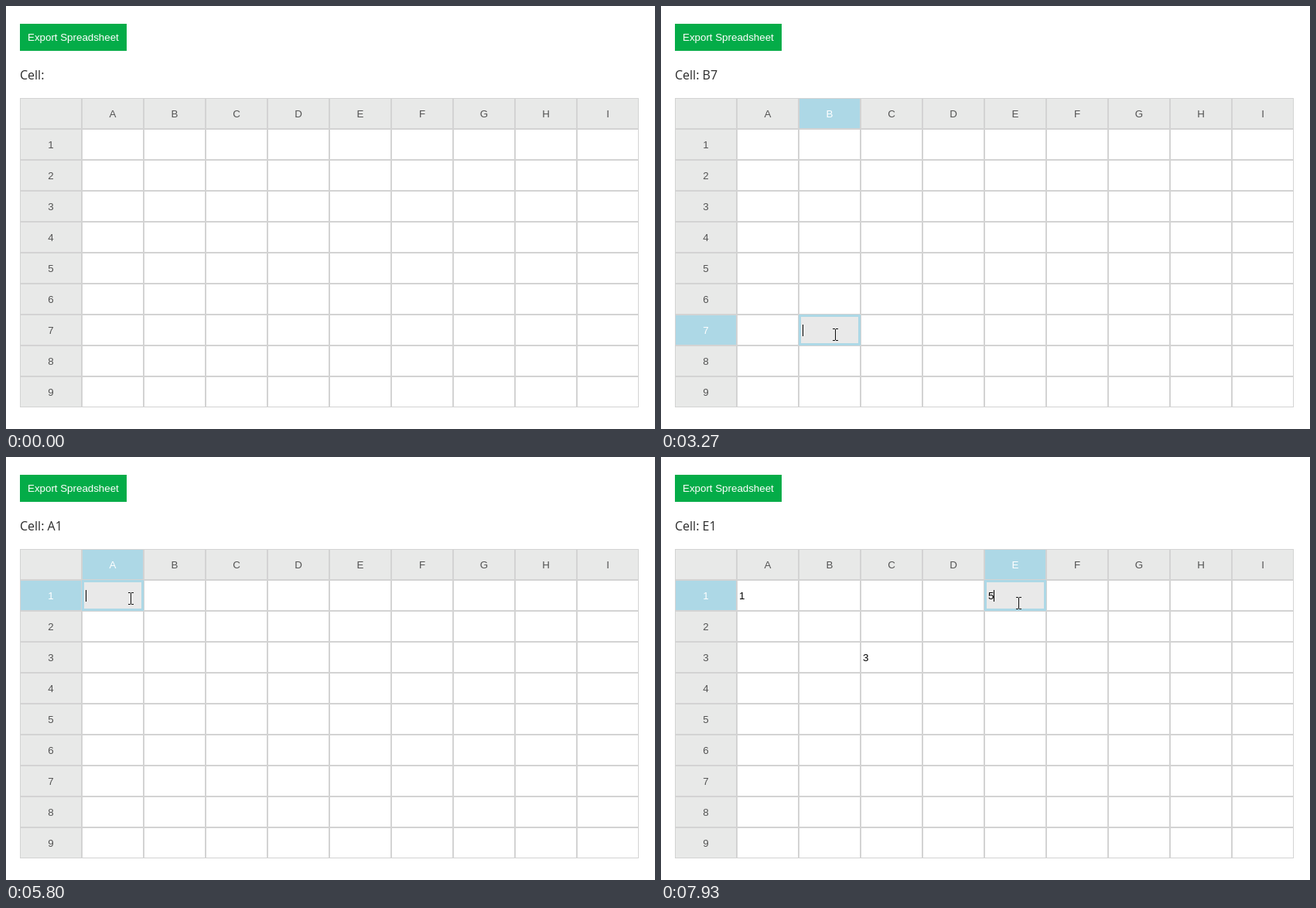
Write an HTML page that moves like this. It is 839 px wide and 547 px high and loops after 7990 ms.

```html
<!DOCTYPE html>
<html lang="en">
<head>
<meta charset="utf-8">
<title>Spreadsheet</title>
<style>
  html, body { margin: 0; width: 100%; height: 100%; overflow: hidden; background: #fff; }
  svg { display: block; width: 839px; height: 547px; }
  text { font: 13.3333px "Liberation Sans", Arial, sans-serif; }
  .label { font: 16px "Open Sans", "Noto Sans", sans-serif; fill: #2a2a2a; }
  .head { text-anchor: middle; }
</style>
</head>
<body>
<svg id="stage" viewBox="0 0 839 547"></svg>
<script>
const LOOP = 7990, STEP = 1000 / 15, BLINK = 600, PRESS = 60;
const X0 = 18, Y0 = 119, W = 80, H = 40, SIZE = 9;
const LETTERS = "ABCDEFGHI";
const GRAY = "#e8e9e8", LINE = "#d3d3d3", BLUE = "#add8e6", INK = "#545454";

// The pointer leaves for (x, y) at `go`, takes `move` ms, then may press a cell and type.
const start = { x: 500, y: 524 };
const stops = [
  { go: 400, move: 333, x: 406, y: 162 },
  { go: 800, move: 133, x: 398, y: 174, cell: "D1", down: 1060 },
  { go: 1333, move: 333, x: 615, y: 361, cell: "G6", down: 1990 },
  { go: 2133, move: 667, x: 225, y: 425, cell: "B7", down: 3200 },
  { go: 3267, move: 533, x: 768, y: 224, cell: "I2", down: 4150 },
  { go: 4267, move: 733, x: 233, y: 256, cell: "B3", down: 5000 },
  { go: 5133, move: 600, x: 161, y: 183, cell: "A1", down: 5730, text: "1", typed: 5990 },
  { go: 6067, move: 533, x: 293, y: 266, cell: "C3", down: 6730, text: "3", typed: 6990 },
  { go: 7067, move: 200, x: 468, y: 211 },
  { go: 7267, move: 267, x: 462, y: 189, cell: "E1", down: 7600, text: "5", typed: 7925 }
];
const clicks = stops.filter(stop => stop.cell);
const entries = clicks.filter(click => click.text);

const stage = document.getElementById("stage");

function set(node, attrs) {
  for (const key in attrs) node.setAttribute(key, attrs[key]);
}

function add(tag, attrs, text = "") {
  const node = document.createElementNS("http://www.w3.org/2000/svg", tag);
  set(node, attrs);
  node.textContent = text;
  return stage.appendChild(node);
}

function show(node, on) {
  node.style.display = on ? "" : "none";
}

function place(cell) {
  const col = LETTERS.indexOf(cell[0]), row = cell[1] - 1;
  return { col, row, x: X0 + (col + 1) * W, y: Y0 + (row + 1) * H };
}

function addBox(col, row, fill) {
  return add("rect", {
    x: X0 + col * W + 0.5, y: Y0 + row * H + 0.5,
    width: W - 1, height: H - 1, fill, stroke: LINE
  });
}

function addHead(col, row, text) {
  const box = addBox(col, row, GRAY);
  const label = add("text", {
    class: "head", x: X0 + (col + 0.5) * W, y: Y0 + row * H + 25
  }, text);
  return { box, label };
}

function paintHead(head, on) {
  set(head.box, { fill: on ? BLUE : GRAY });
  set(head.label, { fill: on ? "#fff" : INK });
}

add("rect", { x: 18, y: 23, width: 138, height: 35, fill: "#04ac48" });
add("text", { x: 28, y: 45, fill: "#fff" }, "Export Spreadsheet");
const status = add("text", { class: "label", x: 18, y: 95 });

addBox(0, 0, GRAY);
const cols = [], rows = [];
for (let i = 0; i < SIZE; i++) {
  cols.push(addHead(i + 1, 0, LETTERS[i]));
  rows.push(addHead(0, i + 1, i + 1));
  for (let j = 0; j < SIZE; j++) addBox(i + 1, j + 1, "#fff");
}

const focusBox = add("rect", {
  width: W - 3, height: H - 3, fill: "#e9e9e9", stroke: BLUE, "stroke-width": 3
});
const values = entries.map(entry => add("text", { fill: "#000" }, entry.text));
const caret = add("rect", { width: 1, height: 15, fill: "#000" });
const halo = add("circle", { r: 12, fill: "#f5f06c" });
const pointer = add("path", {
  d: "M-3.5-7.5h3m1 0h3M-3.5 7.5h3m1 0h3M0-7v14", fill: "none", stroke: "#111"
});

function pointerAt(time) {
  const t = Math.floor((time + 14) / STEP) * STEP + 1;
  const i = stops.filter(stop => stop.go <= t).length - 1;
  if (i < 0) return null;
  const from = stops[i - 1] || start, to = stops[i];
  const p = Math.min(1, (t - to.go) / to.move), e = p * p * (3 - 2 * p);
  const mix = key => Math.round(from[key] + (to[key] - from[key]) * e);
  return { x: mix("x"), y: mix("y") };
}

function drawHeads(chosen) {
  const { col, row } = chosen ? place(chosen.cell) : {};
  status.textContent = "Cell: " + (chosen ? chosen.cell : "");
  cols.forEach((head, i) => paintHead(head, i === col));
  rows.forEach((head, i) => paintHead(head, i === row));
}

function drawCells(t, focus) {
  entries.forEach((entry, i) => {
    const { x, y } = place(entry.cell);
    show(values[i], entry.typed <= t);
    set(values[i], { x: x + (entry === focus ? 5 : 3), y: y + 25 });
  });
  show(focusBox, focus);
  show(caret, focus);
  if (!focus) return;

  const { x, y } = place(focus.cell);
  const filled = focus.typed <= t;
  set(focusBox, { x: x + 1.5, y: y + 1.5 });
  set(caret, { x: x + (filled ? 12 : 5), y: y + 13 });
  show(caret, t - (filled ? focus.typed : focus.down) < BLINK);
}

function drawPointer(t, focus) {
  const spot = pointerAt(t);
  show(pointer, spot);
  show(halo, focus && t < focus.down + PRESS);
  if (!spot) return;
  set(pointer, { transform: `translate(${spot.x + 0.5} ${spot.y})` });
  set(halo, { cx: spot.x - 1.5, cy: spot.y - 1 });
}

function draw(t) {
  const focus = clicks.filter(click => click.down <= t).pop();
  drawHeads(clicks.filter(click => click.down + PRESS <= t).pop());
  drawCells(t, focus);
  drawPointer(t, focus);
}

function tick() {
  draw(performance.now() % LOOP);
  requestAnimationFrame(tick);
}
tick();
</script>
</body>
</html>
```
